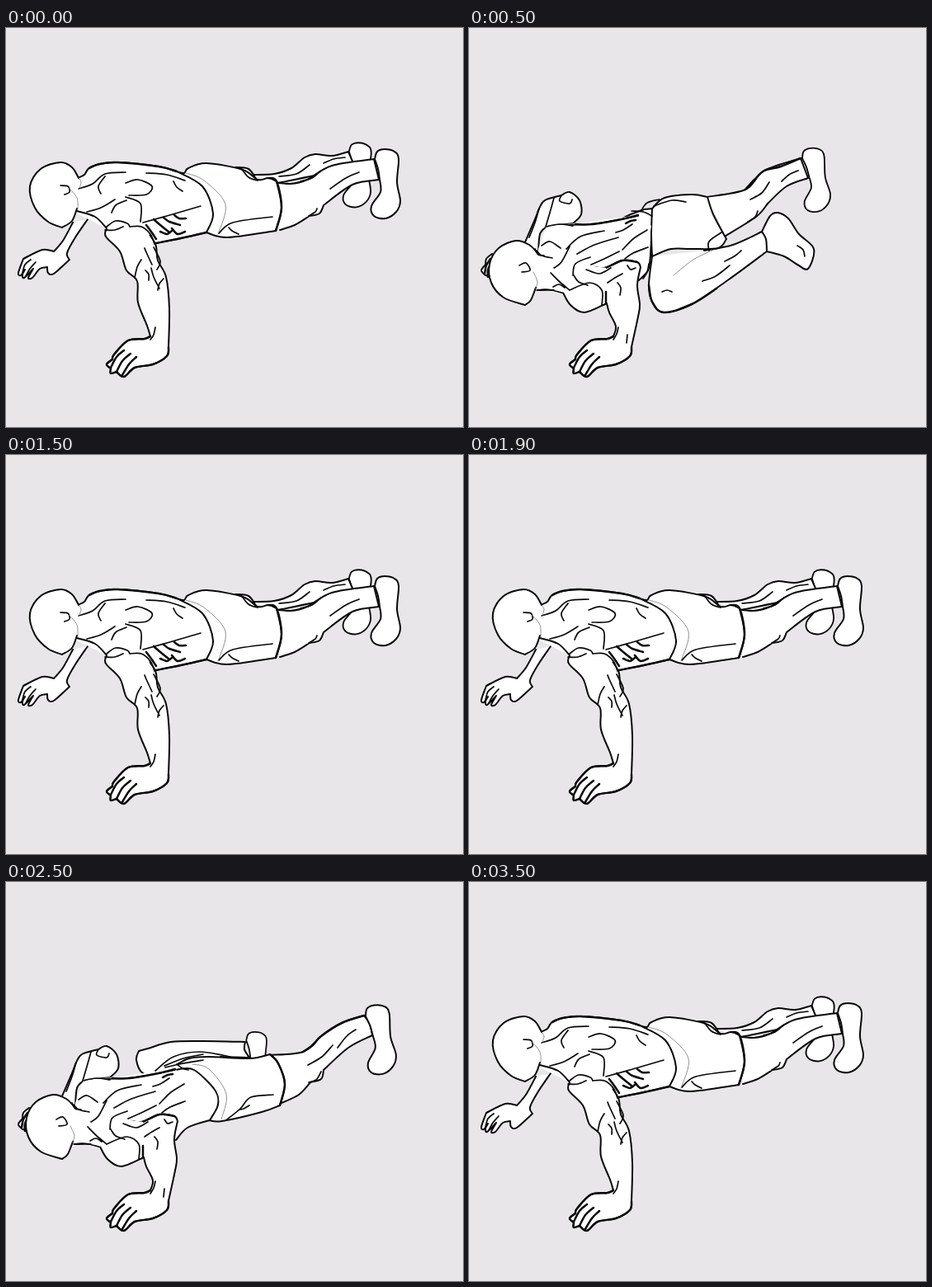
Write an HTML page that moves like this. It is 554x484 px and loops after 3.6 s.

```html
<!DOCTYPE html>
<html lang="en">
<head>
<meta charset="utf-8">
<title>Push-up with knee drive</title>
<style>
  html, body { margin: 0; width: 100%; height: 100%; overflow: hidden; background: #e8e6e9; }
  svg { display: block; width: 554px; height: 484px; }
  path { stroke: #080808; stroke-linecap: round; stroke-linejoin: round; fill: none; }
  .body { fill: #fff; stroke-width: 2; }
  .fill { fill: #fff; stroke: none; }
  .line { stroke-width: 1.7; }
  .heavy { stroke-width: 2.5; }
  .thin { stroke: #777; stroke-width: .8; }
  .pose { animation: 3600ms step-end infinite; }
  #plank { animation-name: plank; }
  #kneeNear { animation-name: near; }
  #kneeFar { animation-name: far; }
  #lowered { animation-name: lowered; }
  @keyframes plank {
    0%, 41.6667%, 97.2222% { visibility: visible; }
    13.8889%, 69.4444% { visibility: hidden; }
  }
  @keyframes near {
    0%, 41.6667% { visibility: hidden; }
    13.8889% { visibility: visible; }
  }
  @keyframes far {
    0%, 97.2222% { visibility: hidden; }
    69.4444% { visibility: visible; }
  }
  @keyframes lowered {
    0%, 41.6667%, 97.2222% { visibility: hidden; }
    13.8889%, 69.4444% { visibility: visible; }
  }
</style>
</head>
<body>
<svg viewBox="0 0 554 484">
  <g class="pose" id="plank"></g>
  <g class="pose" id="kneeNear"></g>
  <g class="pose" id="kneeFar"></g>
  <g class="pose" id="lowered"></g>
</svg>
<script>
// Points are joined by a smooth curve; "/" makes a corner, ";" lifts the pen.
function curve(text) {
  let d = '', last = null;
  for (const run of text.split('/')) {
    const n = run.trim().split(/\s+/).map(Number);
    const p = last ? [last] : [];
    for (let i = 0; i < n.length; i += 2) p.push([n[i], n[i + 1]]);
    if (!last) d += 'M' + p[0];
    for (let i = 0; i < p.length - 1; i++) {
      const a = p[i - 1] || p[i], b = p[i], c = p[i + 1], e = p[i + 2] || c;
      const c1 = [0, 1].map(k => (b[k] + (c[k] - a[k]) / 6).toFixed(1));
      const c2 = [0, 1].map(k => (c[k] - (e[k] - b[k]) / 6).toFixed(1));
      d += `C${c1} ${c2} ${c}`;
    }
    last = p[p.length - 1];
  }
  return d;
}

let pose;
const start = id => pose = document.getElementById(id);

function draw(style, text, transform = '') {
  const path = document.createElementNS('http://www.w3.org/2000/svg', 'path');
  path.setAttribute('class', style);
  path.setAttribute('d', text.split(';').map(curve).join(''));
  path.setAttribute('transform', transform);
  pose.append(path);
}

function shoe(x, y, turn, size) {
  draw('body', '-15 6 -12 -3 -3 -6 9 -3 14 6 12 34 16 57 11 70 -2 78 -16 75 -19 63 -8 46 -9 31 / -11 18 -15 6',
    `translate(${x} ${y}) rotate(${turn}) scale(${size})`);
}

const hand = `175 374 / 168 377 148 379 131 396 129 402 / 122 408 127 413 / 127 419 134 417 /
  143 423 156 412 178 408 195 398 197 387`;

function drawHand() {
  draw('heavy', hand);
  draw('heavy', '143 391 134 399 127 412; 151 395 141 404 134 417; 158 399 149 408 141 421');
}

start('plank');
// far arm
draw('body', `81 236 69 258 58 271 / 44 269 21 280 / 15 297 18 300 23 293 / 20 299 22 303 33 292 /
  27 303 32 303 41 292 50 290 / 51 297 58 298 77 281 / 74 273 84 254 99 232`);
draw('line', '30 281 23 287 20 297; 36 284 29 292 24 301');
// far leg
shoe(430, 145, 3, .93);
draw('body', '298 178 325 177 346 170 362 157 375 153 395 155 415 150 / 421 164 / 395 174 330 188');
draw('line', '331 180 352 177 368 166; 385 164 397 159 411 157');
// near leg
draw('body', '324 187 345 189 365 184 395 167 446 159 / 452 184 / 420 190 385 215 / 380 225 368 228 / 350 239 332 245');
draw('line', '357 186 371 182 382 173; 393 195 412 182 428 175; 367 228 375 223 377 219');
shoe(462, 153, 0, 1);
// shorts
draw('body', '278 169 294 171 303 183');
draw('body', `207 174 / 216 176 221 170 243 164 287 172 305 184 318 182 328 186 / 334 218 327 246 /
  268 254 243 248`);
draw('heavy', '318 182 328 186 334 218 327 246');
draw('line', '258 249 275 236 323 229; 282 250 274 246 270 242; 285 170 294 181 305 185');
draw('thin', '218 176 240 185 266 214 257 250');
// torso
draw('fill', '82 186 / 96 180 / 182 260 / 122 243 / 84 224');
draw('body', '89 181 95 178 104 168 135 163 185 168 207 174 / 238 192 251 225 243 248 / 212 255 182 261');
draw('heavy', '101 170 113 165 135 163 185 168 207 174; 243 248 212 255 182 261');
// near arm
draw('body', `86 222 108 229 122 243 / 121 253 138 271 146 294 159 307 160 333 171 361 175 374 /
  ${hand} / 198 340 194 302 184 282 181 262 167 241`);
drawHand();
draw('fill', '124 242 / 140 225 / 168 235 / 174 251 / 150 264 / 127 255');
// back and shoulder
draw('line', '88 195 105 189 120 177 145 175; 115 201 112 192 120 180; 170 176 195 178 217 185; 203 186 207 193 214 198');
draw('line', '145 188 160 184 177 192 170 202 149 203; 145 205 163 213 163 235; 98 223 115 218 132 208; 128 224 133 215 146 209');
draw('line', '122 241 133 234 147 237 150 241; 150 241 164 241 175 250 180 262; 166 236 195 228 236 216; 120 245 132 245 142 241');
// ribs
draw('heavy', '179 232 187 239 197 247; 191 230 198 235 211 239; 204 227 210 231 218 231');
draw('heavy', '187 247 195 250 201 246; 201 243 208 250 217 247; 170 239 176 247 182 256');
// arm muscles
draw('line', '168 267 170 272 177 287; 164 281 159 290 156 303; 179 266 187 283 183 293; 169 294 173 299 173 306');
draw('line', '176 291 179 302 186 316; 191 304 186 310 184 318; 181 363 179 372 175 378');
// head
draw('body', '88 182 80 169 66 163 42 171 29 192 35 218 51 235 68 242 / 80 234 86 219');
draw('line', '66 191 75 192 77 199 71 202');
draw('thin', '87 221 86 206 76 194; 88 182 91 187 89 194');

start('kneeNear');
// straight leg
draw('body', '288 205 335 196 358 173 402 158 / 411 182 / 385 192 362 213 / 348 229 311 252');
draw('heavy', '335 196 346 184 358 173 378 168 402 158');
draw('line', '341 208 355 200 364 187; 379 186 388 178 399 173; 338 235 347 229 350 222');
shoe(417, 151, -7, .92);
// bent leg
draw('body', '355 247 365 228 374 224 387 231 400 250 418 268 411 292 398 287 382 277 361 271');
draw('line', '398 264 405 269 407 277');
draw('body', `222 277 218 312 222 332 236 345 270 335 315 305 361 271 / 360 256 355 247 /
  320 263 285 270`);
draw('heavy', '218 312 222 332 236 345 270 335 300 316');
draw('line', '283 307 299 301 316 288; 234 320 240 318 246 320; 310 283 323 276 330 270');
draw('thin', '248 300 272 281 301 267');
// waist and shorts
draw('body', '182 233 194 227 212 220 / 223 219 / 220 276 / 217 294 206 306');
draw('line', '218 286 216 296 211 304');
draw('body', '222 219 237 206 270 202 289 205 / 296 226 312 256 / 302 267 270 268 245 268 222 277 / 221 250 222 219');
draw('line', '209 221 216 212 231 208; 197 222 211 223 222 228; 291 270 291 259 306 248; 224 216 246 209 263 211');

start('kneeFar');
// straight leg
draw('body', '320 210 360 206 382 187 407 171 434 162 / 441 172 444 186 / 415 201 385 228 / 382 239 369 243 / 355 258 334 268');
draw('heavy', '360 206 372 198 382 187 407 171 434 162');
draw('line', '366 222 383 212 396 198; 402 201 413 187 424 179; 367 243 376 240 382 230');
shoe(450, 155, -7, 1);
// bent leg
shoe(304, 187, 0, .85);
draw('body', '188 236 166 232 158 216 161 205 / 172 202 200 194 240 193 290 194 / 289 203 295 213 / 260 212');
draw('line', '181 229 203 212 235 206 272 212; 192 223 215 214 239 209');
// shorts
draw('body', `208 221 222 214 245 212 295 214 320 209 / 330 220 338 245 332 271 /
  310 279 262 290 246 289`);
draw('heavy', '320 209 330 220 338 245 332 271');
draw('line', '268 288 284 275 297 261 324 258; 283 276 288 275 295 271; 193 225 210 221 239 216');
draw('thin', '226 221 246 227 267 257 261 288');
// waist
draw('body', '178 235 195 231 210 227 / 228 228 253 252 257 270 247 289 / 220 298 206 313');
draw('line', '213 270 208 277 198 281; 207 221 214 226 221 228');

start('lowered');
// far hand and arm
draw('body', '28 274 21 280 20 287 / 15 294 20 300 / 29 302');
draw('heavy', '26 280 21 288 19 298; 27 286 23 293 23 302');
draw('body', `67 262 80 232 85 219 92 209 112 203 / 122 199 134 209 136 226 126 237 /
  94 241 / 86 250 84 274`);
draw('line', '103 206 98 224 93 241; 112 203 110 210 122 213 125 208; 85 219 80 236 73 254');
// torso
draw('fill', '84 268 / 94 240 / 130 237 / 205 227 / 221 240 / 215 280 / 190 325 / 160 336 / 110 318 / 78 318');
draw('line', '94 241 109 238 126 240; 119 239 155 237 205 228');
draw('heavy', '129 238 150 238 185 232 205 227');
// near arm
draw('body', `83 318 103 318 114 321 / 123 336 140 345 167 334 / 170 345 178 362 175 374 /
  ${hand} / 205 350 207 335 204 312 208 290 / 204 284 186 282 165 291 152 290`);
drawHand();
draw('heavy', '204 284 186 282 165 291 152 290; 103 318 114 321');
draw('fill', '86 276 / 152 289 / 166 291 / 176 320 / 160 330 / 116 321 / 86 314');
// back and shoulder
draw('line', '82 270 88 276 101 279; 88 264 98 259 111 267; 126 300 129 286 147 278; 127 300 133 308 144 312');
draw('line', '99 297 110 308 122 318; 122 318 146 309 161 318 161 336; 102 314 109 311 116 315; 118 268 135 253 164 246');
draw('line', '131 274 152 263 181 254; 148 287 164 280 182 271; 186 269 200 255 216 245; 178 248 187 245 198 238');
draw('line', '189 280 199 273 217 266; 103 291 112 284 122 265; 142 293 158 298 172 291; 192 288 196 293 202 291');
draw('heavy', '190 237 196 234 202 233; 166 320 166 333');
// arm muscles
draw('line', '168 309 177 303 186 298; 180 309 184 315 183 324; 192 372 191 382; 181 363 179 371 175 378');
// head
draw('body', '83 273 73 263 57 258 36 267 25 286 27 309 42 327 68 336 / 75 330 82 312');
draw('fill', '82 274 / 90 279 / 88 314 / 80 314');
draw('line', '61 288 69 285 74 294 64 296; 80 268 84 275 91 276; 82 318 92 317 103 318');
draw('thin', '80 316 83 308 78 296');
</script>
</body>
</html>
```
